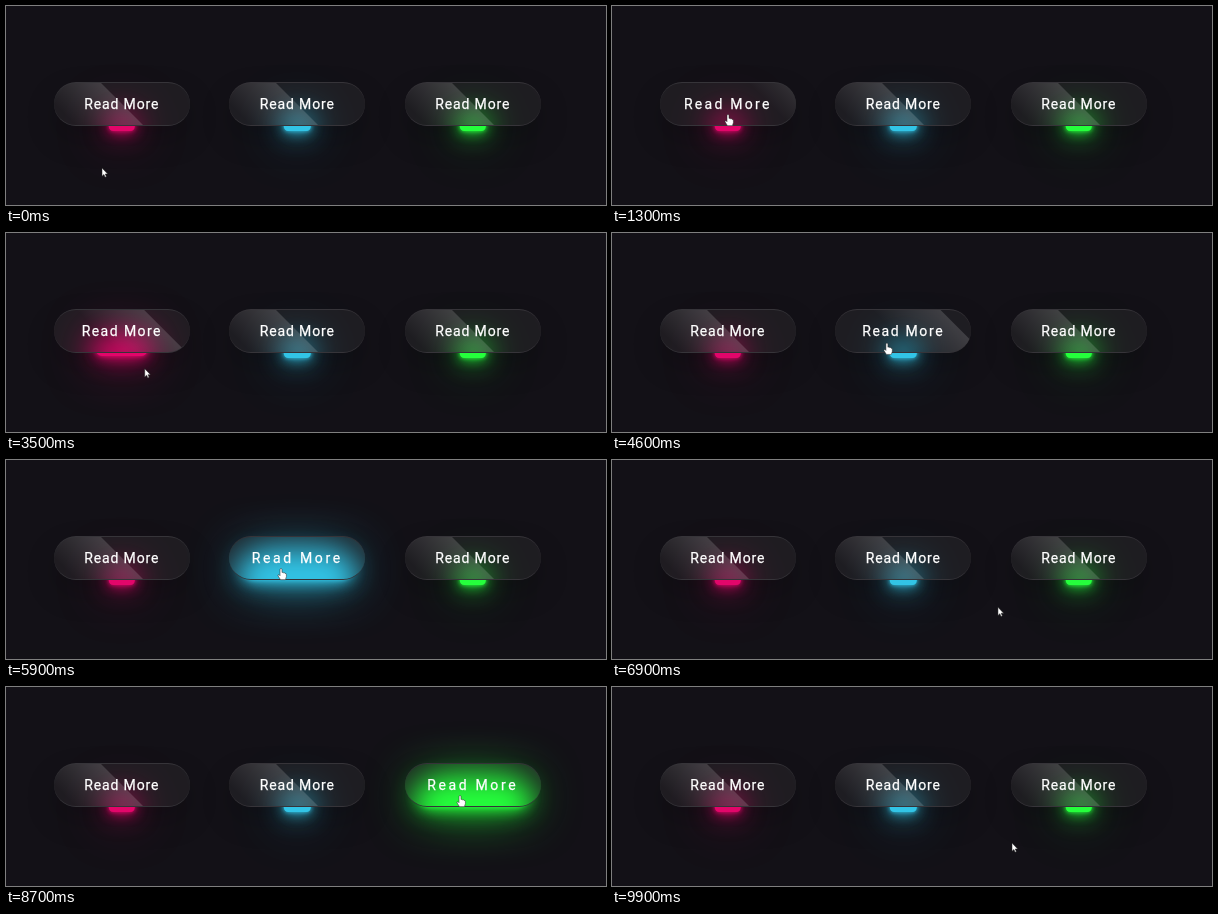
Recreate the animation shown at these times as an HTML page. Size 600 px wide and 199 px high, loop 10 s.

```html
<!DOCTYPE html>
<html lang="en">
<head>
<meta charset="utf-8">
<title>Glass buttons</title>
<style>
html, body { margin: 0; width: 100%; height: 100%; overflow: hidden; background: #131117; }
#stage { position: relative; width: 600px; height: 199px; overflow: hidden; }
.btn {
  position: absolute; top: 76px; width: 136px; height: 44px; border-radius: 22px;
  box-shadow: 0 13px 31px rgba(0, 0, 0, .2);
}
.bar, .blur {
  position: absolute; left: 50%; transform: translateX(-50%);
  background: var(--c);
  box-shadow: 0 0 4.4px var(--c), 0 0 13px var(--c), 0 0 26px var(--c), 0 0 53px var(--c);
}
.blur { filter: blur(13px); }
.glass {
  position: absolute; inset: 0; box-sizing: border-box; overflow: hidden;
  border: solid rgba(255, 255, 255, .1); border-width: 1px 0; border-radius: 22px;
  background: #1f1d22;
  color: #fff; font: 14px/42px Roboto, sans-serif; text-align: center; white-space: nowrap;
  -webkit-text-stroke: .25px #fff;
}
.shine {
  position: absolute; left: 0; top: 0; width: 50%; height: 100%;
  background: linear-gradient(to left, rgba(255, 255, 255, .15), transparent);
}
.label { position: relative; }
svg { position: absolute; left: 0; top: 0; overflow: visible; }
</style>
</head>
<body>
<div id="stage"></div>
<script>
const LOOP = 10000, STEP = 100, FADE = 500, LAG = 150;
const stage = document.getElementById('stage');

// enter and leave are the times the pointer crosses the button's edge, rest is where it stops
const buttons = [
  { color: '#e2066a', enter: 1050, leave: 3300, rest: 116 },
  { color: '#32c4e6', enter: 4470, leave: 6150, rest: 275 },
  { color: '#25ff3c', enter: 7400, leave: 9100, rest: 454 }
];

buttons.forEach((b, i) => {
  const el = document.createElement('div');
  el.className = 'btn';
  el.style.left = 47.8 + 175.5 * i + 'px';
  el.style.setProperty('--c', b.color);
  el.innerHTML = `<div class="bar"></div>
    <div class="glass"><div class="blur"></div><div class="shine"></div><span class="label">Read More</span></div>`;
  stage.append(el);
  for (const part of ['bar', 'blur', 'shine', 'label']) b[part] = el.querySelector('.' + part).style;
});

stage.insertAdjacentHTML('beforeend', `
<svg width="1" height="1" fill="#fff" stroke="#222" stroke-width=".5" stroke-linejoin="round">
  <path id="arrow" d="M0 0V8.2L1.9 6.5 3.1 9.2 4.4 8.6 3.2 6H5.7Z"/>
  <path id="hand" d="M-1 .6Q0-.8 1 .6V4Q2.2 3.3 2.7 4.4 4 3.8 4.2 5 5.4 4.8 5.4 6V8.2L4.4 11.2H-.5L-3 7.3Q-3.2 6-2 6.2L-1 7.2Z"/>
</svg>`);
const arrow = document.getElementById('arrow'), hand = document.getElementById('hand');

// The pointer waits at each stop and sags by dip on the way to the next
const stops = [
  { x: 96, y: 162, arrive: 0, depart: 400, dip: 0 },
  ...buttons.map((b, i) => ({
    x: b.rest, y: 108.5, arrive: b.enter + LAG, depart: b.leave - LAG, dip: i < 2 ? 40 : 0
  })),
  { x: 400, y: 156, arrive: 9500, depart: LOOP, dip: 0 }
];

const mix = (a, b, k) => a + (b - a) * k;
const clamp = v => Math.min(1, Math.max(0, v));
const smooth = k => k * k * (3 - 2 * k);

// The CSS "ease" curve, cubic-bezier(.25, .1, .25, 1)
function ease(x) {
  if (x <= 0 || x >= 1) return clamp(x);
  const curve = (u, a, b) => 3 * a * u * (1 - u) ** 2 + 3 * b * u * u * (1 - u) + u ** 3;
  let lo = 0, hi = 1;
  for (let i = 0; i < 20; i++) {
    const mid = (lo + hi) / 2;
    if (curve(mid, .25, .25) < x) lo = mid; else hi = mid;
  }
  return curve(lo, .1, 1);
}

const hover = (t, b, delay) => t < b.leave
  ? ease((t - b.enter - delay) / FADE)
  : 1 - ease((t - b.leave) / FADE);

function setBox(style, width, height, bottom, radius) {
  style.width = width + 'px';
  style.height = height + 'px';
  style.bottom = bottom + 'px';
  style.borderRadius = radius + 'px';
}

function drawButton(b, t) {
  const k = hover(t, b, 0), glow = hover(t, b, FADE);
  b.label.letterSpacing = mix(.88, 2.63, k) + 'px';
  b.shine.transform = `skewX(45deg) translateX(${200 * k}%)`;

  const width = mix(26.4, 108.8, glow), height = mix(8.8, 22, glow);
  const bottom = mix(-4.6, 0, glow), radius = mix(8.8, 26.4, glow);
  const inside = height + bottom;
  setBox(b.bar, width, height, bottom, radius);
  // Behind the glass the bar is mirrored at the lower edge
  setBox(b.blur, width, 2 * inside, -inside, radius);
}

function drawPointer(t) {
  const i = stops.findIndex(s => t < s.depart);
  const to = stops[i], from = stops[i - 1] || to;
  const k = i ? clamp((t - from.depart) / (to.arrive - from.depart)) : 1;
  const x = mix(from.x, to.x, smooth(k));
  const y = mix(from.y, to.y, smooth(k)) + from.dip * Math.sin(Math.PI * k);
  const over = buttons.some(b => t >= b.enter && t < b.leave);
  arrow.style.display = over ? 'none' : '';
  hand.style.display = over ? '' : 'none';
  (over ? hand : arrow).setAttribute('transform', `translate(${x} ${y})`);
}

const start = performance.now();
function frame() {
  const t = Math.floor((performance.now() - start) % LOOP / STEP) * STEP;
  for (const b of buttons) drawButton(b, t);
  drawPointer(t);
  requestAnimationFrame(frame);
}
frame();
</script>
</body>
</html>
```
